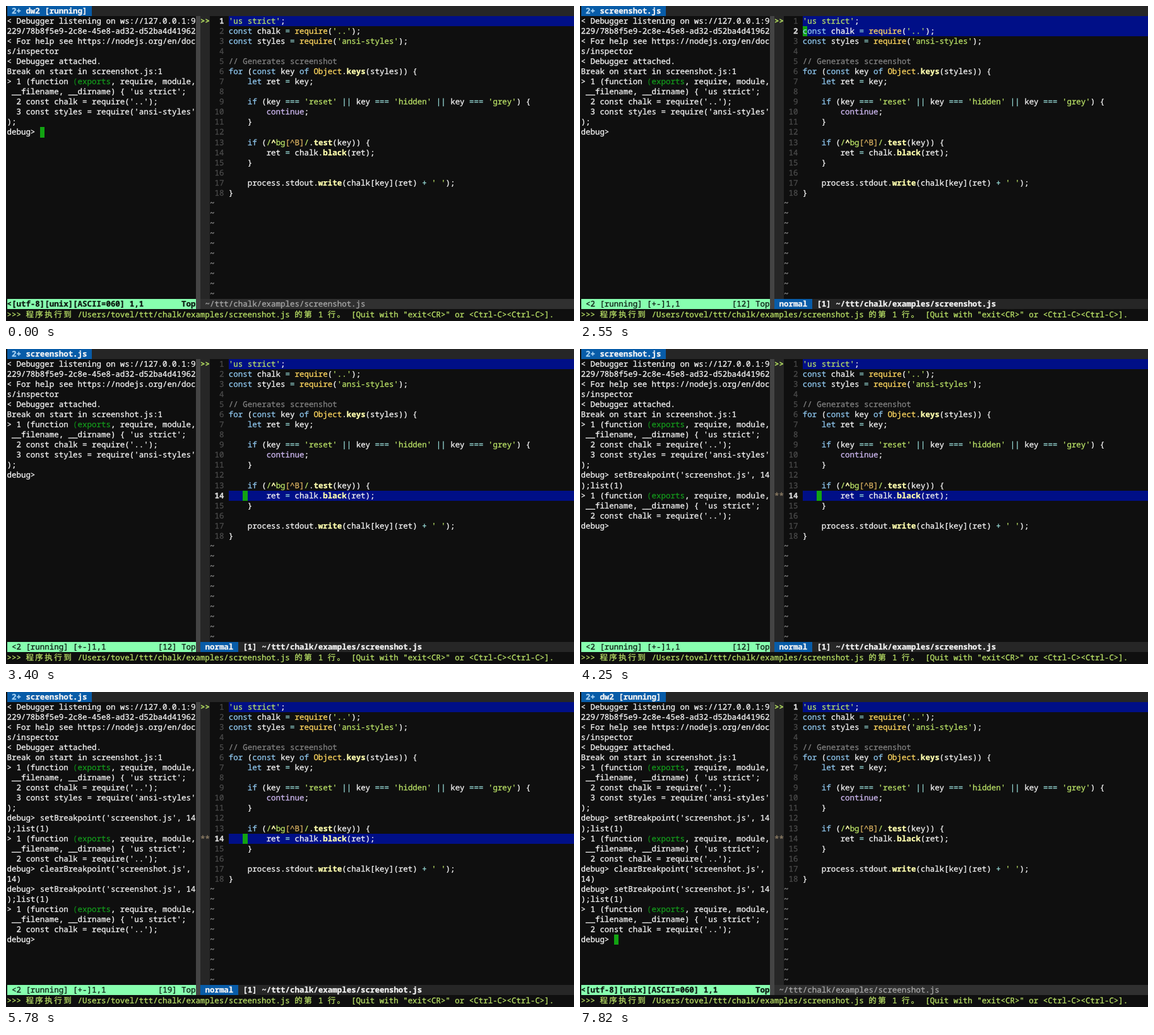
Write an HTML page that moves like this. It is 900 px wide and 500 px high and loops after 7.99 s.

```html
<!DOCTYPE html>
<html lang="en">
<head>
<meta charset="utf-8">
<title>Debugger session</title>
<style>
  html, body { margin: 0; width: 100%; height: 100%; overflow: hidden; background: #0f0f0f; }
  #screen {
    position: relative; width: 900px; height: 500px; overflow: hidden;
    font: 500 12.46px/16px "Noto Sans Mono", "Noto Sans CJK SC", monospace;
    font-variant-ligatures: none; text-rendering: geometricPrecision;
    -webkit-text-stroke: .3px; color: #f4f4f4;
  }
  #screen div { position: absolute; height: 16px; white-space: pre; }
  .bold, .fn, .current, .sign { font-weight: 700; }
  .string, .message { color: #b9e066; }
  .keyword { color: #8fc7ee; }
  .operator { color: #9be0dc; }
  .builtin { color: #ffd75f; }
  .fn { color: #ffffaf; }
  .jump { color: #cdb8f0; }
  .set { color: #d7af5f; }
  .comment { color: #808080; }
  .number { color: #4a4a4a; }
  .tilde { color: #8c8c8c; }
  .current { color: #d8d8d8; }
  .sign { color: #afd75f; }
  .mark { color: #857660; }
  .paren { color: #0f7d16; }
  .exports { color: #149a1c; }
  .dark { color: #0c1a12; }
  .pale { color: #a9d4f5; }
  .faded { color: #a8a8a8; }
  .wide { font-family: "Noto Sans CJK SC", "Noto Sans CJK", sans-serif; letter-spacing: .2em; }
</style>
</head>
<body>
<div id="screen"></div>
<script>
const LOOP = 7990, STEP = 170;
const CELL = 12.46 * 0.6, LEFT = 1.5, ROW = 16.04;
const SIGN_COL = 41, NUMBER_COL = 43, CODE_COL = 47, PANE = 40;
const BLUE = '#000f87', TAB_BLUE = '#085ca8', MINT = '#87ffaf', GREEN = '#12a312';

// Moments of the session, in ms
const AT = {
  toCode: 1020, lineTwo: 2380, down: [2550, 3400],
  set: 3910, clear: 4930, reset: 5610,
  up: [6290, 7140], toDebug: 7480
};

const code = `'us strict';
const chalk = require('..');
const styles = require('ansi-styles');

// Generates screenshot
for (const key of Object.keys(styles)) {
    let ret = key;

    if (key === 'reset' || key === 'hidden' || key === 'grey') {
        continue;
    }

    if (/^bg[^B]/.test(key)) {
        ret = chalk.black(ret);
    }

    process.stdout.write(chalk[key](ret) + ' ');
}`.split('\n');

const listing = `> 1 (function (exports, require, module,
 __filename, __dirname) { 'us strict';
  2 const chalk = require('..');`;

const intro = `< Debugger listening on ws://127.0.0.1:9
229/78b8f5e9-2c8e-45e8-ad32-d52ba4d41962
< For help see https://nodejs.org/en/doc
s/inspector
< Debugger attached.
Break on start in screenshot.js:1
${listing}
  3 const styles = require('ansi-styles'
);
debug> `;

const setOutput = `setBreakpoint('screenshot.js', 14
);list(1)
${listing}
debug> `;

const clearOutput = `clearBreakpoint('screenshot.js',
14)
debug> `;

const codeSyntax = new RegExp([
  /(?<comment>\/\/.*)/, /(?<string>'[^']*'|\/(?=\^)|bg|(?<=\])\/)/,
  /(?<set>\[\^B\])/, /(?<keyword>\b(?:const|for|of|let|if)\b)/,
  /(?<builtin>require|Object)/, /(?<fn>keys|test|black|write|\^)/,
  /(?<jump>continue)/, /(?<operator>===|\|\||=|\+)/
].map(part => part.source).join('|'), 'g');
const logSyntax = /(?<paren>\((?=exports))|(?<exports>exports)/g;
const wideSyntax = /(?<wide>[\u3000-\u9fff]+)/g;

const escapeHtml = text => text.replace(/&/g, '&amp;').replace(/</g, '&lt;');

function highlight(text, syntax) {
  let html = '', end = 0;
  for (const match of text.matchAll(syntax)) {
    const kind = Object.keys(match.groups).find(name => match.groups[name]);
    html += escapeHtml(text.slice(end, match.index)) +
      `<span class="${kind}">${escapeHtml(match[0])}</span>`;
    end = match.index + match[0].length;
  }
  return html + escapeHtml(text.slice(end));
}

const x = col => LEFT + col * CELL;

const box = (col, row, cols, color, rows = 1) =>
  `<div style="left:${x(col)}px;top:${row * ROW}px;width:${cols * CELL}px;` +
  `height:${rows * ROW}px;background:${color}"></div>`;

const write = (col, row, text, kind = '', syntax = /(?!)/g) =>
  `<div class="${kind}" style="left:${x(col)}px;top:${row * ROW}px">${highlight(text, syntax)}</div>`;

const toRight = col => (900 - x(col)) / CELL;

function ramp(time, [start, end], from, to) {
  const part = Math.min(1, Math.max(0, (time - start) / (end - start)));
  return Math.round(from + (to - from) * part);
}

function stateAt(time) {
  let line = time < AT.lineTwo ? 1 : ramp(time, AT.down, 2, 14);
  if (time >= AT.up[0]) line = ramp(time, AT.up, 14, 1);
  return {
    line,
    inDebug: time < AT.toCode || time >= AT.toDebug,
    marked: time >= AT.set && time < AT.clear || time >= AT.reset,
    count: time < AT.clear ? 12 : time < AT.reset ? 17 : 19,
    log: intro + (time >= AT.set ? setOutput : '') +
      (time >= AT.clear ? clearOutput : '') + (time >= AT.reset ? setOutput : '')
  };
}

function tabBar({ inDebug }) {
  return box(0, 0, toRight(0), '#262626') + box(0, 0, 18, TAB_BLUE) +
    write(1, 0, '2+', 'bold pale') +
    write(4, 0, inDebug ? 'dw2 [running]' : 'screenshot.js', 'bold');
}

function debugPane({ log, inDebug }) {
  const lines = log.split('\n');
  return (inDebug ? box(7, lines.length, 1, GREEN) : '') +
    lines.map((text, i) => write(0, i + 1, text, '', logSyntax)).join('');
}

function codePane({ line, inDebug, marked }) {
  let html = box(PANE, 1, 1, '#444', 29) + box(SIGN_COL, 1, 2, '#262626', 28) +
    box(CODE_COL, 1, toRight(CODE_COL), BLUE);
  if (!inDebug) {
    // On an indented line the cursor rests on the last cell of the tab
    const offset = code[line - 1].startsWith(' ') ? 3 : 0;
    html += box(CODE_COL, line, toRight(CODE_COL), BLUE) +
      box(CODE_COL + offset, line, 1, GREEN);
  }
  html += write(SIGN_COL, 1, '>>', 'sign');
  if (marked) html += write(SIGN_COL, 14, '**', 'mark bold');
  code.forEach((text, i) => {
    const row = i + 1;
    html += write(NUMBER_COL, row, String(row).padStart(3), row === line ? 'current' : 'number') +
      write(CODE_COL, row, text, '', codeSyntax);
  });
  for (let row = code.length + 1; row < 29; row++) html += write(NUMBER_COL, row, '~', 'tilde');
  return html;
}

function statusLines({ inDebug, count }) {
  const path = '~/ttt/chalk/examples/screenshot.js';
  const left = box(0, 29, PANE, MINT);
  if (inDebug) {
    return left + box(SIGN_COL, 29, toRight(SIGN_COL), '#303030') +
      write(0, 29, '<[utf-8][unix][ASCII=060] 1,1', 'dark bold') +
      write(37, 29, 'Top', 'dark bold') + write(42, 29, path, 'faded');
  }
  return left + box(SIGN_COL, 29, toRight(SIGN_COL), '#262626') +
    box(SIGN_COL, 29, 8, TAB_BLUE) +
    write(1, 29, '<2 [running] [+-]1,1', 'dark') + write(32, 29, `[${count}] Top`, 'dark') +
    write(42, 29, 'normal', 'bold') + write(50, 29, '[1] ' + path, 'bold');
}

const message = write(0, 30, '>>> 程序执行到 /Users/tovel/ttt/chalk/examples/screenshot.js ' +
  '的第 1 行。 [Quit with "exit<CR>" or <Ctrl-C><Ctrl-C>].', 'message', wideSyntax);

const stage = document.getElementById('screen');
let shown = '';

function draw() {
  const time = Math.floor(performance.now() % LOOP / STEP) * STEP;
  const state = stateAt(time);
  const html = tabBar(state) + debugPane(state) + codePane(state) + statusLines(state) + message;
  if (html !== shown) stage.innerHTML = shown = html;
  requestAnimationFrame(draw);
}
draw();
</script>
</body>
</html>
```
